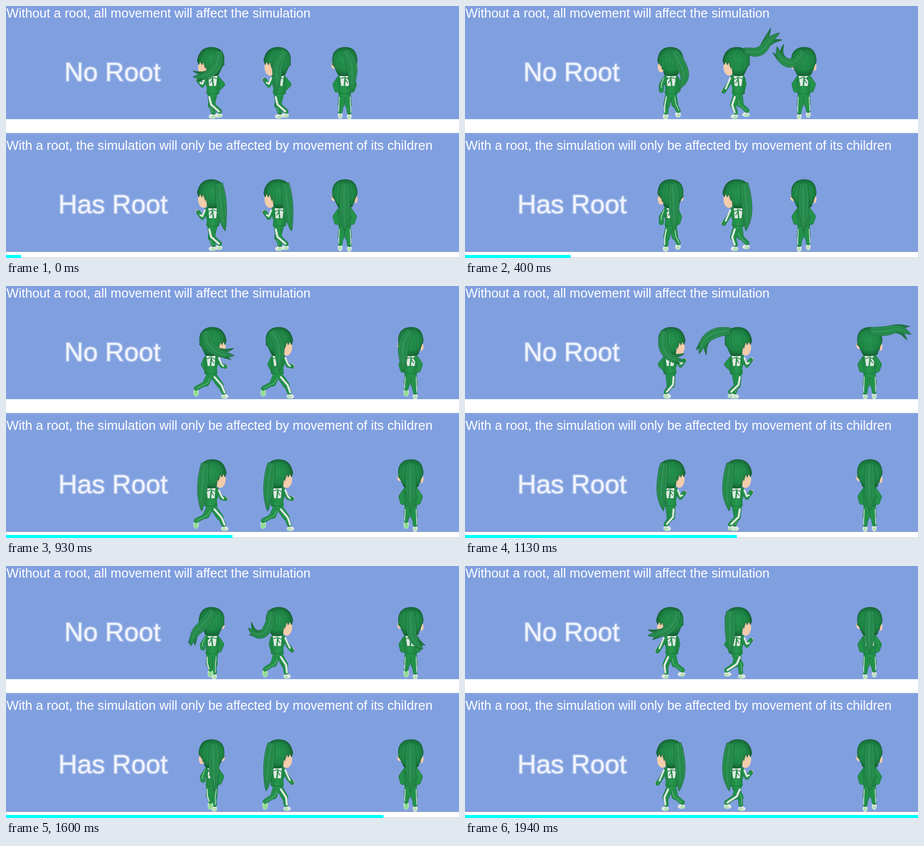
Animation of 900x501 px, one loop 2.01 s. Source, as an HTML page with a canvas:

```html
<!DOCTYPE html>
<html lang="en">
<head>
<meta charset="utf-8">
<title>Hair simulation with and without a root</title>
<style>
  html, body { margin: 0; width: 100%; height: 100%; overflow: hidden; background: #fff; }
  svg, canvas { position: absolute; left: 0; top: 0; display: block; }
  text { font-family: "Liberation Sans", Arial, sans-serif; fill: #fff; white-space: pre; }
  .note { font-size: 25.66px; }
  .label, .halo { font-size: 52.1px; }
  .label { fill: #f0f4fd; filter: blur(.7px); }
  .halo { fill: none; stroke: #fff; stroke-width: 2.5px; opacity: .45; filter: blur(1.2px); }
</style>
</head>
<body>
<svg width="900" height="501" viewBox="0 0 900 501">
  <rect width="900" height="501" fill="#fff"/>
  <rect width="900" height="225" fill="#809fdf"/>
  <rect y="252.5" width="900" height="236" fill="#809fdf"/>
  <rect y="488" width="900" height="1" fill="#8f9bb8"/>
  <rect y="500" width="900" height="1" fill="#c4c4c4"/>
  <rect id="bar" y="495" width="30" height="6" fill="#0ff"/>
  <text class="note" x="1" y="23">Without a root, all movement will affect the simulation</text>
  <text class="note" x="1" y="286">With a root, the simulation will only be affected by movement of its children</text>
  <text class="halo" x="116" y="149">No Root</text>
  <text class="label" x="116" y="149">No Root</text>
  <text class="halo" x="104" y="411.8">Has Root</text>
  <text class="label" x="104" y="411.8">Has Root</text>
</svg>
<canvas id="stage" width="900" height="501"></canvas>
<script>
const ctx = document.getElementById('stage').getContext('2d');
const bar = document.getElementById('bar');
const LOOP = 2010, STEP = 66.3, LAST = 29;
const ROW = 263;      // distance between the two panels
const FLIP = 13.5;    // step of the sudden turn and jump
const SPIN = 30.5;    // steps per swing of the turning girl
const STRIDE = 5.7;   // steps per stride
const C = {
  suit: '#23914a', suitDark: '#176f38', hair: '#1f8747', hairDark: '#115c2d',
  tail: '#298d4f', edge: '#0f4f27', white: '#dfe8e1', skin: '#f3cdac', sole: '#92dc94'
};
const { PI, sin, cos, abs, min, max, floor, exp, sqrt } = Math;

const mix = (a, b, k) => a + (b - a) * k;
const bell = (x, w) => exp(-((x / w) ** 2));
const joints = f => [0, 1, 2].map(f);

function trace(points) {
  ctx.beginPath();
  points.forEach(([x, y]) => ctx.lineTo(x, y));
}

function line(points, width, color) {
  trace(points);
  ctx.lineWidth = width;
  ctx.strokeStyle = color;
  ctx.stroke();
}

function shape(points, color) {
  trace(points);
  ctx.closePath();
  ctx.fillStyle = color;
  ctx.fill();
}

function oval(x, y, rx, ry, color) {
  ctx.beginPath();
  ctx.ellipse(x, y, rx, ry, 0, 0, 7);
  ctx.fillStyle = color;
  ctx.fill();
}

function limb(points, width, color) {
  line(points, width + 1.2, C.suitDark);
  line(points, width, color);
}

// the run cycle places a foot in depth, the yaw projects it
function foot(side, step, yaw) {
  const u = step / STRIDE + .03;
  const reach = abs(sin(PI * u)) ** .6;
  const rear = floor(u) % 2 ? 1 : -1;
  const depth = 7 * reach - 11 + (side === rear ? -26 : 26) * reach;
  const x = yaw * depth + side * 9 * sqrt(1 - yaw * yaw);
  return [x, 218.5 - (side === rear ? 8 * reach : 0)];
}

function leg(side, step, yaw) {
  const a = abs(yaw), face = yaw < 0 ? -1 : 1;
  const [x, y] = foot(side, step, yaw);
  const hip = [side * mix(5.5, 3, a) - yaw, 177];
  const knee = [mix(hip[0], x, .45) + yaw * 5, mix(177, y, .48)];
  const ankle = [x, y - 7];
  if (y < 214) {
    oval(x, y + 1, 5.5, 8.5, C.white);
    oval(x, y + 2, 4.5, 7, C.sole);
  } else {
    oval(x + yaw * 2, y + 1, mix(4.8, 7.5, a), mix(6.5, 4.6, a), C.white);
    oval(x, y + 2.5, mix(3.4, 4.5, a), 3, '#b5e0b4');
  }
  limb([hip, knee], 12, C.suit);
  limb([knee, ankle], 8, C.suit);
  line([hip, knee], 11, C.suit);
  const near = side === face;
  const off = mix(side * 4.5, face * 2.5, a);
  const stripe = [[hip[0] + off * 1.2, 181], [knee[0] + off, knee[1]], [ankle[0] + off * .7, ankle[1]]];
  line(stripe, mix(1.5, near ? 4 : .5, a), C.white);
}

function torso(a, reach) {
  const elbow = [-mix(19, 13 + 8 * reach, a), 156];
  limb([[-11, 144], elbow, [-mix(16, 10, a), 167]], 9, C.suit);
  const g = ctx.createLinearGradient(-16, 0, 16, 0);
  g.addColorStop(0, '#1c7d40');
  g.addColorStop(.45, '#27994f');
  g.addColorStop(1, '#1c7d40');
  const s = -2 * a;
  shape([[-12, 137], [12, 137], [15, 146], [12 + s, 163], [13 + s, 174], [s, 181], [-13 + s, 174], [-13 + s, 163], [-15, 146]], g);
  line([[-12 + s, 173], [s, 175], [12 + s, 173]], 1, C.suitDark);

  // white back panel with cuts
  const w = mix(10, 9, a);
  shape([[s - w, 139], [s + w, 139], [s + w * .8, 159], [s - w * .7, 159]], C.white);
  line([[s - w, 145], [s, 142], [s + w, 146]], 1.8, C.suit);
  line([[s + 1, 143], [s - 1, 160]], 2.8, C.suit);
  line([[s + 1, 146], [s + w * .6, 153]], 1.4, C.suitDark);

  const hand = [mix(15, 27, a), mix(167, mix(170, 147, reach), a)];
  const bend = [19, mix(156, 158, a)];
  oval(hand[0] + 1.5, hand[1] - 1, 3.4 * a, 3.8 * a, C.skin);
  limb([[11, 144], bend, hand], mix(9, 7, a), C.suit);
  line([[14, 143], [bend[0], 155], [mix(bend[0], hand[0], .5), mix(bend[1], hand[1], .5)]], 3.4 * a + .1, C.white);
}

function head(a) {
  oval(-22, 118, 4.5 * (1 - a), 7, C.skin);
  oval(mix(21, 16.5, a), 121, mix(4.5, 11, a), mix(8, 17.5, a), C.skin);
  const fringe = (x0, y0, x1, y1) => ctx.lineTo(mix(x0, x1, a), mix(y0, y1, a));
  const g = ctx.createRadialGradient(-2, 106, 3, 0, 110, 31);
  g.addColorStop(0, '#26954f');
  g.addColorStop(.6, C.hair);
  g.addColorStop(1, C.hairDark);
  ctx.beginPath();
  ctx.moveTo(-24, 113);
  ctx.bezierCurveTo(-27, 91, -15, 82, 1, 82);
  ctx.bezierCurveTo(17, 82, 24 + 2 * a, 91, 25 + 4 * a, 109);
  fringe(23, 115, 26, 117);
  fringe(24, 112, 23, 110);
  fringe(21, 120, 20, 117);
  fringe(21, 118, 17, 111);
  fringe(19, 128, 13, 124);
  fringe(18, 126, 11, 119);
  fringe(15, 136, 9, 136);
  ctx.quadraticCurveTo(0, 142, -13, 137);
  ctx.lineTo(-17, 129);
  ctx.lineTo(-20, 122);
  ctx.lineTo(-25, 116);
  ctx.closePath();
  ctx.fillStyle = g;
  ctx.fill();
  ctx.lineWidth = .7;
  ctx.strokeStyle = C.edge;
  ctx.stroke();
  ctx.globalAlpha = .35;
  for (let k = -3; k <= 3; k++) {
    ctx.beginPath();
    ctx.moveTo(k * 2, 85);
    ctx.quadraticCurveTo(k * 7, 96, k * 6, 118 + (k * k * 5) % 11);
    ctx.stroke();
  }
  ctx.globalAlpha = 1;
}

// follows a bending strand; returns centre points with their heading
function strand(x, y, bends, length, bias) {
  const n = 24, out = [];
  for (let i = 0; i <= n; i++) {
    const t = i / n, u = min(max(t * 3 - .5, 0), 2), j = min(floor(u), 1);
    const r = (mix(bends[j], bends[j + 1], u - j) + bias * t * t) * PI / 180;
    out.push({ x, y, r, t });
    x += sin(r) * length / n;
    y += cos(r) * length / n;
  }
  return out;
}

function lock(points, width, color) {
  const side = k => points.map(p => {
    const d = k * width * max(sin(PI * (.2 + .8 * p.t)), 0) ** .7;
    return [p.x + cos(p.r) * d, p.y - sin(p.r) * d];
  });
  const rim = [...side(1), ...side(-1).reverse()];
  shape(rim, color);
  ctx.globalAlpha = .6;
  line([...rim, rim[0]], .8, C.edge);
  ctx.globalAlpha = .28;
  line(side(-.5), 1, C.edge);
  line(side(-.1).slice(2, 20), 2, '#45b06c');
  line(side(.4), 1, C.edge);
  ctx.globalAlpha = 1;
}

function ponytail(x, bends, length) {
  const wild = min(1, max(...bends.map(abs)) / 120);
  if (wild > .3) {
    lock(strand(x, 89, bends, length * .95, 42 * wild), 5.5, '#217d44');
    lock(strand(x, 89, bends, length * .97, -34 * wild), 5.5, '#1f7a42');
  }
  lock(strand(x, 89, bends, length, 0), mix(10.5, 9, wild), C.tail);
}

// bend angles in degrees: 0 hangs down, 90 points right; each joint lags the one above
const sway = step => joints(j => (34 + 27 * j) * cos(2 * PI * (step - 8.3 - 3.6 * j) / SPIN));

function whip(age, peak, power) {
  const inertia = bell(age, 2);
  return joints(j => mix(power * (1 + .4 * j) * bell(age - peak - 1.9 * j, 3.3), j ? 0 : -36, inertia));
}

function girl(x, y, step, yaw, bends) {
  const a = abs(yaw), face = yaw < 0 ? -1 : 1;
  const reach = .5 - .5 * face * cos(PI * step / STRIDE);
  const hanging = [-7 * yaw, -5 * yaw, a * (18 * reach - 8)];
  ctx.save();
  ctx.translate(x, y);
  leg(-face, step, yaw);
  leg(face, step, yaw);
  ctx.save();
  ctx.scale(face, 1);
  torso(a, reach);
  head(a);
  ctx.restore();
  ponytail(-14 * yaw, bends || hanging, bends ? 85 : 96);
  ctx.restore();
}

function draw(step) {
  ctx.clearRect(0, 0, 900, 501);
  ctx.lineCap = ctx.lineJoin = 'round';
  bar.setAttribute('width', 30 * (step + 1));
  const late = step > FLIP, dir = late ? 1 : -1;
  const age = late ? step - FLIP : step + .5;
  const cast = [
    { x: 409, yaw: -cos(2 * PI * step / SPIN), bends: sway(step) },
    { x: 541, yaw: dir, bends: whip(age, 4.8, 105).map(b => -dir * b) },
    { x: late ? 804 : 673, yaw: 0, bends: whip(age, 3, 95).map(b => dir * b) }
  ];
  for (const { x, yaw, bends } of cast) {
    girl(x, 0, step, yaw, bends);
    girl(x, ROW, step, yaw);
  }
}

const origin = performance.now();
let shown = -1;
function tick() {
  const step = min(LAST, floor((performance.now() - origin) % LOOP / STEP));
  if (step !== shown) draw(shown = step);
  requestAnimationFrame(tick);
}
tick();
</script>
</body>
</html>
```
